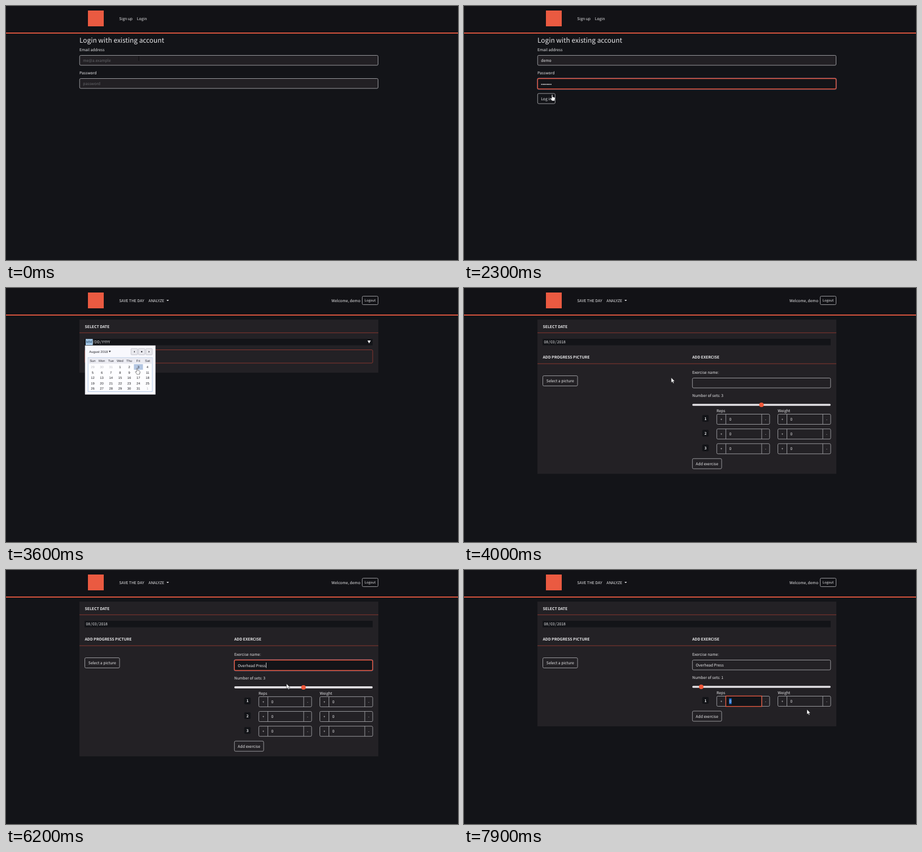
Write an HTML page that moves like this. It is 800 px wide and 450 px high and loops after 8000 ms.

```html
<!DOCTYPE html>
<html lang="en">
<head>
<meta charset="utf-8">
<title>Workout diary</title>
<style>
html, body { margin: 0; width: 100%; height: 100%; overflow: hidden; background: #131418; }
svg { display: block; width: 800px; height: 450px; }
text { font-family: "Noto Sans CJK JP", "Noto Sans CJK SC", "Noto Sans CJK", "Open Sans", sans-serif; fill: #e9e9eb; text-rendering: geometricPrecision; white-space: pre; }
.arial text, text.arial { font-family: "Liberation Sans", Arial, sans-serif; }
</style>
</head>
<body>
<svg id="stage" viewBox="0 0 800 450"></svg>
<script>
const LOOP = 8000, BG = '#131418', PANEL = '#232125', ORANGE = '#ea5a41', RULE = '#87372f', EDGE = '#98989c';
const NS = 'http://www.w3.org/2000/svg';
const stage = document.getElementById('stage');

function el(parent, tag, attrs = {}) {
  const e = document.createElementNS(NS, tag);
  set(e, attrs);
  return parent.appendChild(e);
}
function set(e, attrs) { for (const k in attrs) e.setAttribute(k, attrs[k]); }
const group = (parent, attrs) => el(parent, 'g', attrs);
const show = (e, on) => { e.style.display = on ? '' : 'none'; };
const shift = (e, x, y) => e.setAttribute('transform', `translate(${x} ${y})`);
const rect = (p, x, y, width, height, fill, more) => el(p, 'rect', { x, y, width, height, fill, ...more });
const path = (p, d, fill, more) => el(p, 'path', { d, fill, ...more });
// The latin letters of this font are drawn about 1.12 times larger than its nominal size.
function label(p, x, y, str, size = 7.62, more = {}) {
  const e = el(p, 'text', { x, y, 'font-size': size / 1.12, ...more });
  e.textContent = str;
  return e;
}
const title = (p, x, y, str) => label(p, x, y, str, 7.62, { 'font-weight': 600 });
const outline = (p, x, y, w, h) => rect(p, x, y, w, h, 'none', { stroke: EDGE, rx: 2 });
function button(p, x, y, w, h, str, size = 7.62) {
  const g = group(p);
  outline(g, x, y, w, h);
  label(g, x + w / 2, y + h / 2 + size * .34, str, size, { 'text-anchor': 'middle' });
  return g;
}

// Text field: grows by about a pixel while it has the focus
function field(p, x, y, w, fill, hint = '') {
  const g = group(p);
  const glow = rect(g, x - 1, y - 1, w + 2, 20.6, 'none', { stroke: '#4a6595', 'stroke-opacity': .55, rx: 3 });
  const box = rect(g, x, y, w, 17.5, fill, { stroke: EDGE, rx: 2 });
  const ghost = label(g, x + 6, y + 11.9, hint, 7.62, { style: 'fill:#66676b' });
  const text = label(g, x + 6, y + 11.9, '');
  const caret = rect(g, 0, y + 4.5, .8, 9.5, '#e9e9eb');
  return (value, focus, caretOn = focus) => {
    show(glow, focus);
    set(box, { fill: focus ? BG : fill, stroke: focus ? ORANGE : EDGE, 'stroke-width': focus ? 1.4 : 1, height: focus ? 18.5 : 17.5 });
    show(ghost, !value);
    text.textContent = value;
    text.setAttribute('y', y + 11.9 + (focus ? .5 : 0));
    show(caret, caretOn);
    if (caretOn) caret.setAttribute('x', x + 6.5 + (value ? text.getComputedTextLength() : 0));
    return text;
  };
}

// ---- Frame and header
rect(stage, 0, 0, 800, 450, BG);
rect(stage, 0, 0, 800, 47, '#121216');
rect(stage, 0, 47, 800, 1.8, ORANGE);
const page = group(stage);
rect(page, 145, 8, 28, 28, ORANGE);

// ---- Login page
const login = group(page);
label(login, 200.3, 24.8, 'Sign up');
label(login, 231.8, 24.8, 'Login');
label(login, 130, 65, 'Login with existing account', 13.3);
label(login, 130, 80.4, 'Email address');
const email = field(login, 130.3, 87.5, 528.2, '#222024', 'me@a.example');
const lower = group(login);
label(lower, 130, 121.4, 'Password');
const password = field(lower, 130.3, 128.5, 528.2, '#222024', 'password');
const loginButton = button(login, 130.3, 155, 31, 18, 'Log in');

// ---- Diary page
const diary = group(page);
label(diary, 200.3, 24.8, 'SAVE THE DAY');
label(diary, 252.3, 24.8, 'ANALYZE');
path(diary, 'M284 21h4.4l-2.2 2.3z', '#e9e9eb');
label(diary, 627, 24.8, 'Welcome, demo', 7.62, { 'text-anchor': 'end' });
button(diary, 630.5, 14.5, 28, 15, 'Logout', 6.67);
const panel = rect(diary, 130, 56, 529, 94, PANEL);
title(diary, 139.5, 70.6, 'SELECT DATE');
rect(diary, 130, 78.8, 529, 1, RULE);
rect(diary, 139, 90, 510, 11.5, BG);

const empty = group(diary);
const mark = rect(empty, 141, 90.3, 12.6, 10.8, '#a9cdec');
const arrowDown = path(empty, 'M639.8 93h5.8l-2.9 5.2z', '#f2f2f4');
rect(empty, 139.5, 109.5, 509.5, 23.5, 'none', { stroke: RULE, rx: 2 });

function dateText(p, parts) {
  const e = label(p, 141.4, 98.3, '');
  return parts.map((s, i) => {
    const part = el(e, 'tspan', i ? { dx: .7 } : {});
    part.textContent = s;
    return part;
  });
}
const month = dateText(empty, ['MM', '/', 'DD', '/', 'YYYY'])[0];

// ---- Calendar popup
const cal = group(diary, { class: 'arial' });
const ink = (c, more) => ({ style: 'fill:' + c, ...more });
const small = (x, y, s, c) => label(cal, x, y, s, 6.5, ink(c, { 'text-anchor': 'middle' }));
rect(cal, 140, 102, 124.3, 86.6, '#f8f8fd', { stroke: '#c9c9d2', 'stroke-width': .6 });
label(cal, 147.3, 114.8, 'August 2018', 6.6, ink('#26262c'));
path(cal, 'M181.8 111.3h3.8l-1.9 2.6z', '#26262c');
for (const x of [221.3, 234.3, 247.5]) rect(cal, x, 107.3, 11.4, 11, '#e9e9ee', { stroke: '#b4b4bd', 'stroke-width': .7, rx: 1 });
path(cal, 'M228 111.2v3.4l-2-1.7zM252.4 111.2v3.4l2-1.7zM239 111.7h2.3v2.3h-2.3z', '#3c3c44');
rect(cal, 145.2, 123.3, 113.8, 60, '#fdfdff', { stroke: '#9fbbdf', 'stroke-width': .8 });
rect(cal, 145.6, 123.7, 113, 10.6, '#ebebf2');
rect(cal, 226.4, 135, 16, 9.8, '#b3c6e2');
['Sun', 'Mon', 'Tue', 'Wed', 'Thu', 'Fri', 'Sat'].forEach((d, i) => small(153.4 + 16.17 * i, 131.3, d, '#33333b'));
for (let i = 0; i < 35; i++) {
  const day = i - 2, out = day < 1 || day > 31;
  small(153.4 + 16.17 * (i % 7), 142.2 + 9.55 * Math.floor(i / 7), day < 1 ? day + 31 : day > 31 ? day - 31 : day, out ? '#b9b9c0' : '#1d1d22');
}

// ---- Exercise form
const form = group(diary);
dateText(form, ['08', '/', '03', '/', '2018']);
title(form, 139.5, 125.3, 'ADD PROGRESS PICTURE');
title(form, 404, 125.3, 'ADD EXERCISE');
rect(form, 130, 133.6, 529, 1, RULE);
button(form, 139.5, 155.5, 61.5, 18, 'Select a picture');
label(form, 404, 152.4, 'Exercise name:');
const exercise = field(form, 404.3, 159.5, 244.5, PANEL);
const below = group(form);
const setsLabel = label(below, 404, 193.4, '');
rect(below, 404, 205.2, 245, 3.6, '#e2e0e4', { rx: 1.8 });
const knob = el(below, 'circle', { cy: 207, r: 4, fill: '#f0583a' });
label(below, 447, 219.8, 'Reps');
label(below, 555.3, 219.8, 'Weight');

function counter(p, x) {
  outline(p, x, 223.5, 93.5, 18);
  path(p, `M${x + 16} 223.5v18M${x + 79.5} 223.5v18`, 'none', { stroke: EDGE });
  label(p, x + 8, 234.8, '+', 6.67, { 'text-anchor': 'middle' });
  label(p, x + 22, 235.2, '0');
  label(p, x + 86.5, 234.8, '-', 6.67, { 'text-anchor': 'middle' });
}
const PITCH = 26.15;
const rows = Array.from({ length: 20 }, (_, i) => {
  const row = group(below);
  shift(row, 0, PITCH * i);
  rect(row, 421.7, 225, 11.4, 12, BG, { rx: 2 });
  label(row, 427.4, 233.6, i + 1, 7.4, { 'text-anchor': 'middle', 'font-weight': 700 });
  counter(row, 447.4);
  counter(row, 555.5);
  return row;
});
const reps = group(below);
rect(reps, 463.4, 223.3, 63.5, 18.4, BG, { stroke: ORANGE, 'stroke-width': 1.3 });
rect(reps, 469.2, 227.5, 4.4, 10, '#1c6fd6');
label(reps, 469.4, 235.2, '0');
const addButton = button(below, 404.3, 223.8, 51.7, 18, 'Add exercise');

// ---- Pointer
const pointer = group(stage);
const skin = { stroke: '#1a1a1e', 'stroke-width': .5 };
const shapes = {
  beam: path(pointer, 'M-.4-4h.8v8h-.8z', '#08080a'),
  arrow: path(pointer, 'M0 0v8.8l2-1.8 1.5 3.1 1.4-.6-1.4-3h2.7z', '#fff', skin),
  hand: path(pointer, 'M-.8.4q.8-1 1.7 0v3.6l3.4.9q1 .4.9 1.7l-.9 4.4h-4.6l-2.8-4.2q0-1.2 1.3-.7l1 .9z', '#fff', skin)
};

// ---- Timeline
const at = (steps, t) => steps.filter(s => s[0] <= t).pop()[1];
const typed = (times, t) => times.filter(k => k <= t).length;
const emailKeys = [400, 500, 600, 700];
const passKeys = [1300, 1400, 1500, 1600, 1800, 1900, 2000, 2000];
const nameKeys = [4500, 4600, 4700, 5000, 5000, 5100, 5200, 5200, 5300, 5500, 5600, 5700, 5800, 5900];
const slider = [[0, 10], [6400, 12], [6500, 15], [6600, 18], [6700, 19], [6800, 20], [6900, 19], [7000, 18], [7100, 16], [7300, 12], [7400, 6], [7500, 2], [7600, 1]];
const moves = [
  [0, 235, 93, 'beam'], [900, 235, 93, 'beam'], [1100, 211, 133, 'beam'], [2000, 211, 133, 'beam'],
  [2300, 156, 157, 'hand'], [2600, 156, 157, 'hand'], [2700, 157, 160, 'arrow'], [3200, 642, 95, 'arrow'],
  [3300, 642, 95, 'arrow'], [3600, 232, 142, 'hand'], [3700, 232, 142, 'arrow'], [4200, 440, 168, 'beam'],
  [4900, 440, 168, 'beam'], [5000, 326, 177, 'arrow'], [5900, 326, 177, 'arrow'], [6300, 528, 206, 'hand'],
  [7600, 422, 206, 'arrow'], [7800, 498, 231, 'beam'], [7900, 607, 247, 'arrow'], [8000, 607, 247, 'arrow']
];
function pointerAt(t) {
  const i = Math.max(0, moves.findIndex(m => m[0] > t) - 1);
  const [t0, x0, y0, kind] = moves[i], [t1, x1, y1] = moves[i + 1];
  const k = (t - t0) / (t1 - t0), e = k * k * (3 - 2 * k);
  return [x0 + (x1 - x0) * e, y0 + (y1 - y0) * e, kind];
}

function draw(t) {
  const inside = t >= 2700, picked = t >= 3700;
  show(login, !inside);
  show(diary, inside);
  let dx = 0;

  if (!inside) {
    const onEmail = t >= 200 && t < 1100, onPass = t >= 1100;
    email('demo'.slice(0, typed(emailKeys, t)), onEmail);
    const dots = typed(passKeys, t);
    const text = password('•'.repeat(dots), onPass, onPass && !dots);
    text.setAttribute('class', 'arial');
    text.setAttribute('font-size', 6.7);
    shift(lower, 0, onEmail ? .9 : 0);
    show(loginButton, t >= 400);
  } else {
    const open = t >= 3300 && !picked;
    show(empty, !picked);
    show(cal, open);
    show(mark, open);
    show(arrowDown, t >= 3100);
    month.style.fill = open ? '#1c3c5c' : '';
    show(form, picked);
    if (picked) {
      const value = at(slider, t), n = t < 6400 ? 3 : value;
      const focus = t >= 4300 && t < 6400, dy = focus ? .9 : 0;
      dx = n > 7 ? -4 : 0;
      exercise('Overhead Press'.slice(0, typed(nameKeys, t)), focus);
      shift(below, 0, dy);
      setsLabel.textContent = 'Number of sets: ' + n;
      knob.setAttribute('cx', 408 + 11.85 * value);
      rows.forEach((row, i) => show(row, i < n));
      show(reps, t >= 7800);
      shift(addButton, 0, PITCH * n);
      panel.setAttribute('height', 194.8 + PITCH * n + dy);
    } else panel.setAttribute('height', 94);
  }

  shift(page, dx, 0);
  let [x, y, kind] = pointerAt(t);
  if (t >= 6400 && t < 7600) [x, y, kind] = [411 + 11.85 * at(slider, t) + dx, 206, 'hand'];
  shift(pointer, x, y);
  for (const k in shapes) show(shapes[k], k === kind);
}

let last = -1;
function tick(now) {
  const t = Math.floor(now % LOOP / 100) * 100;
  if (t !== last) draw(last = t);
  requestAnimationFrame(tick);
}
draw(0);
requestAnimationFrame(tick);
</script>
</body>
</html>
```
